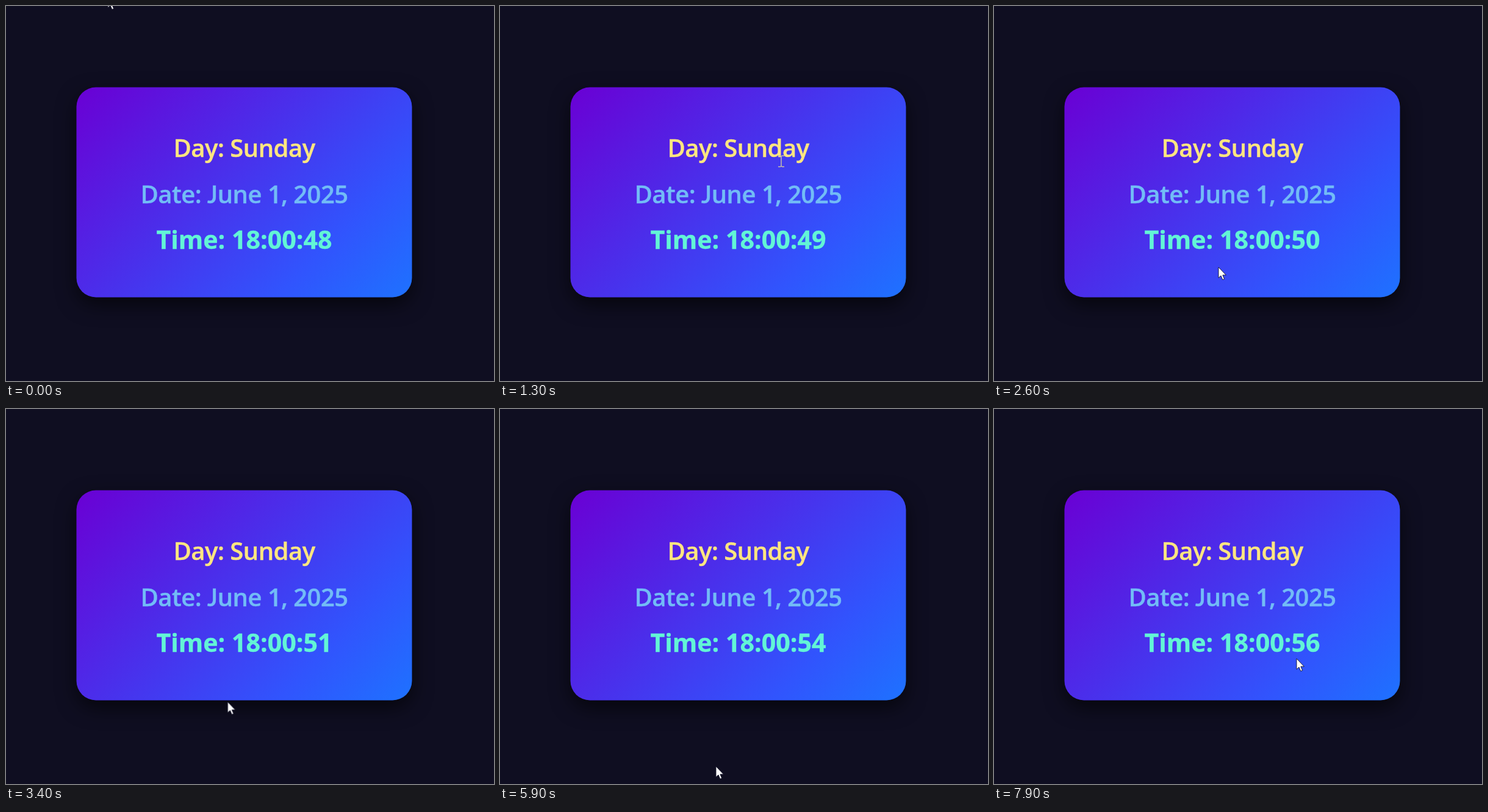
These frames come from a looping animation (800 by 616 pixels, 8 s). An HTML page:

```html
<!DOCTYPE html>
<html lang="en">
<head>
<meta charset="utf-8">
<title>Clock card</title>
<style>
  html, body { margin: 0; width: 100%; height: 100%; overflow: hidden; background: #0f0e21; }
  .card {
    position: absolute; left: 115px; top: 133px; width: 550px; height: 345px;
    transform: translate(.5px, .5px);
    border-radius: 32px;
    background: linear-gradient(135deg, #6a00d4, #3154fd 75%, #1e72ff);
    box-shadow: 0 12px 32px rgba(0, 0, 0, .6);
  }
  svg { position: absolute; left: 0; top: 0; }
  text {
    font: 600 40px "Open Sans", "Noto Sans", sans-serif; letter-spacing: -.5px;
    text-anchor: middle; fill: currentColor; stroke: currentColor; stroke-width: .4;
  }
  .day { color: #ffe680; }
  .date { color: #72bcf6; }
  .time { color: #62f5d6; font-weight: 700; font-size: 41.2px; letter-spacing: 0; }
  .cap { font-family: Lato, "Open Sans", sans-serif; }

  .pointer, .arrow, .beam { animation: move 8s infinite ease-in-out; }
  .arrow { animation-name: arrow; fill: #fff; stroke: #15152a; stroke-width: .9; }
  .beam { animation-name: beam; fill: none; stroke: #c8bfa8; stroke-width: 1.5; }

  @keyframes move {
    0% { transform: translate(167px, -15px); }
    6.25% { transform: translate(236px, 235px); }
    16.25% { transform: translate(461px, 255px); }
    32.5% { transform: translate(368px, 429px); animation-timing-function: ease-in; }
    52%, 80% { transform: translate(354px, 587px); animation-timing-function: ease-out; }
    98.75%, 100% { transform: translate(496px, 410px); }
  }
  /* The pointer is a beam while it crosses the text */
  @keyframes arrow {
    0%, 9%, 28%, 100% { visibility: visible; }
    9.01%, 27.99% { visibility: hidden; }
  }
  @keyframes beam {
    0%, 9%, 28%, 100% { visibility: hidden; }
    9.01%, 27.99% { visibility: visible; }
  }
</style>
</head>
<body>
<div class="card"></div>
<svg width="800" height="616" viewBox="0 0 800 616">
  <text class="day" x="390.5" y="248">Day: Sunday</text>
  <text class="date" x="390.5" y="324">Date: <tspan class="cap">J</tspan>une 1, 2025</text>
  <text class="time" x="390.5" y="399">Time: 18:00:<tspan id="sec">48</tspan></text>
  <g class="pointer">
    <path class="arrow" d="M0 0V17.6L4 14L6.8 20.6L9.6 19.4L6.9 13H12.4Z"/>
    <path class="beam" d="M-5 -9H-1.5L0 -8L1.5 -9H5M0 -8V8M-5 9H-1.5L0 8L1.5 9H5"/>
  </g>
</svg>
<script>
  const LOOP = 8000, FIRST_SECOND = 48, TICK_OFFSET = 200;
  const sec = document.getElementById("sec");

  function tick() {
    const t = performance.now() % LOOP;
    sec.textContent = FIRST_SECOND + Math.floor((t + TICK_OFFSET) / 1000);
    requestAnimationFrame(tick);
  }
  tick();
</script>
</body>
</html>
```
